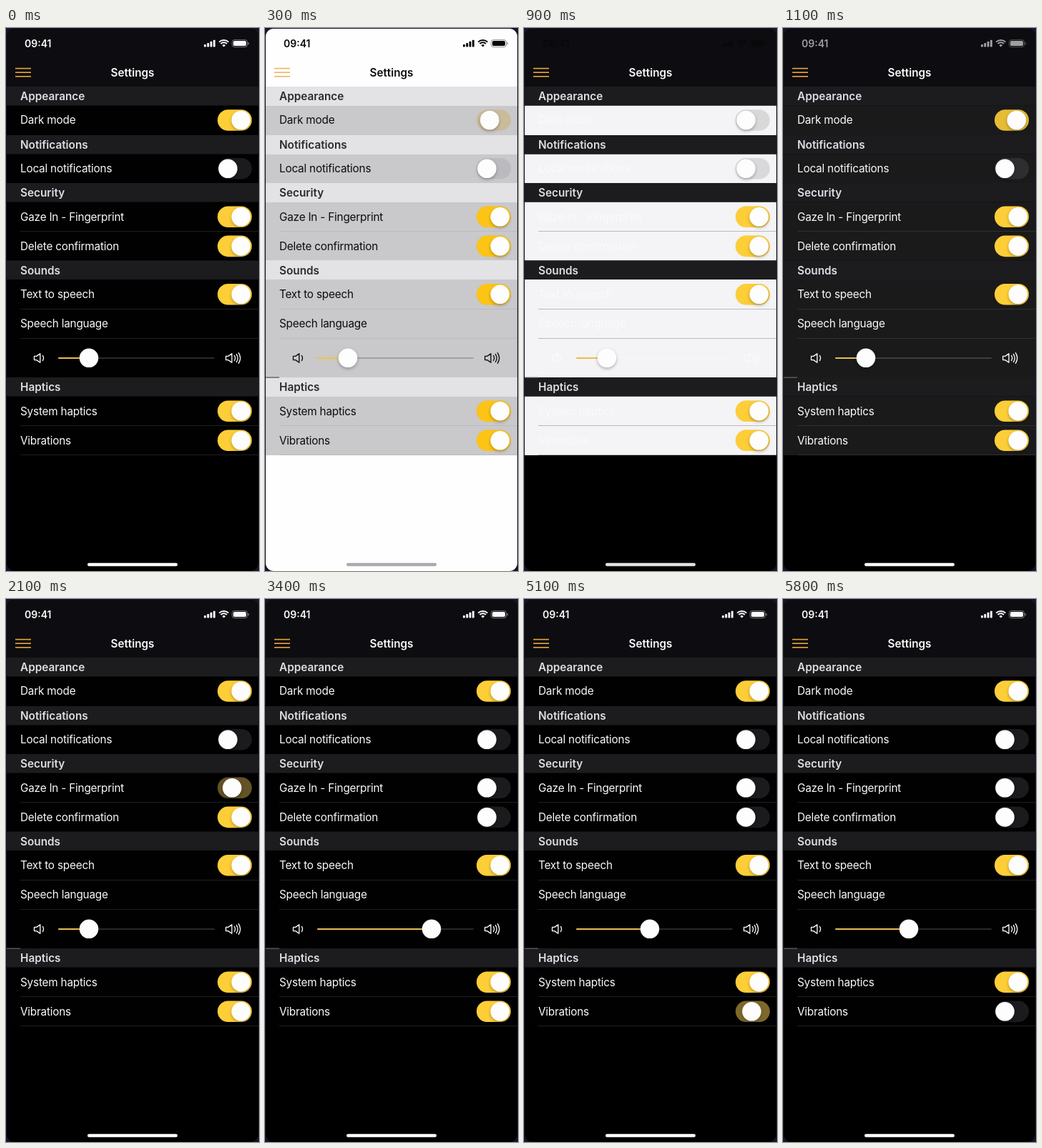
These frames come from a looping animation (354 by 760 pixels, 5.9 s). An HTML page with a canvas:

```html
<!DOCTYPE html>
<html lang="en">
<head>
<meta charset="utf-8">
<title>Settings</title>
<style>
html, body { margin: 0; width: 100%; height: 100%; overflow: hidden; background: #15152b; }
canvas { display: block; width: 354px; height: 760px; }
</style>
</head>
<body>
<canvas id="stage"></canvas>
<script>
const W = 354, H = 760, LOOP = 5900;
const LIGHT_AT = 138, DARK_AT = 895, FADE = 300;
const FONT = 'Inter, "Open Sans", sans-serif';
const canvas = document.getElementById('stage');
const ctx = canvas.getContext('2d');
const dpr = window.devicePixelRatio || 1;
canvas.width = W * dpr;
canvas.height = H * dpr;

const sections = [
  ['Appearance', 82, 108.5, 150],
  ['Notifications', 150, 176.5, 217],
  ['Security', 217, 243.5, 325.5],
  ['Sounds', 325.5, 352, 489],
  ['Haptics', 489, 515.5, 598]
];
const labels = [
  ['Dark mode', 129], ['Local notifications', 197],
  ['Gaze In - Fingerprint', 264.5], ['Delete confirmation', 305.5],
  ['Text to speech', 373], ['Speech language', 414],
  ['System haptics', 536.5], ['Vibrations', 577.5]
];
const separators = [284.5, 393.5, 434.5, 556.5, 597.5];
// Slider drag: time, x
const drag = [[3000, 116], [3400, 233], [3650, 250], [4300, 176]];

const clamp = v => Math.max(0, Math.min(1, v));
const mix = (a, b, p) => a + (b - a) * p;
const rgb = (a, b, p) => `rgb(${a.map((v, i) => Math.round(mix(v, b[i], p)))})`;
const gray = v => rgb([v, v, v], [v, v, v], 0);
const easeOut = (t, start, dur = FADE) => 1 - (1 - clamp((t - start) / dur)) ** 2;
const switchOff = (t, start) => 1 - easeOut(t, start);

function sliderX(t) {
  if (t <= drag[0][0]) return drag[0][1];
  for (let i = 1; i < drag.length; i++) {
    const [t0, x0] = drag[i - 1], [t1, x1] = drag[i];
    if (t < t1) {
      const q = (t - t0) / (t1 - t0);
      return mix(x0, x1, q * q * (3 - 2 * q));
    }
  }
  return drag[drag.length - 1][1];
}

function rect(x, y, w, h, color) {
  ctx.fillStyle = color;
  ctx.fillRect(x, y, w, h);
}

function pill(x, y, w, h, r, color) {
  ctx.fillStyle = color;
  ctx.beginPath();
  ctx.roundRect(x, y, w, h, r);
  ctx.fill();
}

function text(str, x, y, size, weight, color, align = 'left', spacing = 0) {
  ctx.font = `${weight} ${size}px ${FONT}`;
  ctx.textAlign = align;
  ctx.letterSpacing = spacing + 'px';
  ctx.fillStyle = color;
  ctx.fillText(str, x, y);
}

function knob(x, y) {
  ctx.save();
  ctx.shadowColor = 'rgba(0,0,0,.28)';
  ctx.shadowBlur = 4 * dpr;
  ctx.shadowOffsetY = 2 * dpr;
  ctx.fillStyle = '#fdfdfd';
  ctx.beginPath();
  ctx.arc(x, y, 13.3, 0, Math.PI * 2);
  ctx.fill();
  ctx.restore();
}

function toggle(y, on, light) {
  const track = light ? 'rgba(120,120,128,.17)' : 'rgba(120,120,128,.22)';
  pill(296, y - 14.8, 48, 29.6, 14.8, track);
  if (on > 0) {
    ctx.globalAlpha = on;
    pill(296, y - 14.8, 48, 29.6, 14.8, light ? '#fcc414' : '#fdce38');
    ctx.globalAlpha = 1;
  }
  knob(mix(310.5, 328.8, on), y);
}

function statusBar(color) {
  text('09:41', 26, 26.5, 14, 600, color);
  for (let i = 0; i < 4; i++) {
    const h = 3.5 + i * 2.1;
    pill(277 + i * 4.3, 26.5 - h, 2.9, h, 0.8, color);
  }
  ctx.strokeStyle = color;
  ctx.lineWidth = 2;
  ctx.lineCap = 'butt';
  for (const r of [9.3, 6]) {
    ctx.beginPath();
    ctx.arc(304.8, 26.2, r, -Math.PI * 0.75, -Math.PI * 0.25);
    ctx.stroke();
  }
  ctx.fillStyle = color;
  ctx.beginPath();
  ctx.moveTo(304.8, 26.5);
  ctx.arc(304.8, 26.5, 3.3, -Math.PI * 0.75, -Math.PI * 0.25);
  ctx.fill();
  ctx.globalAlpha = 0.45;
  ctx.lineWidth = 1;
  ctx.beginPath();
  ctx.roundRect(316.5, 16.6, 21, 10, 3);
  ctx.stroke();
  pill(338.6, 19.9, 1.4, 3.6, 0.7, color);
  ctx.globalAlpha = 1;
  pill(318, 18.1, 18, 7, 1.8, color);
}

function speaker(x, y, waves, color) {
  ctx.strokeStyle = color;
  ctx.lineWidth = 1.35;
  ctx.lineJoin = ctx.lineCap = 'round';
  ctx.beginPath();
  ctx.moveTo(x, y - 2.6);
  ctx.lineTo(x + 3.2, y - 2.6);
  ctx.lineTo(x + 8.3, y - 6.3);
  ctx.lineTo(x + 8.3, y + 6.3);
  ctx.lineTo(x + 3.2, y + 2.6);
  ctx.lineTo(x, y + 2.6);
  ctx.closePath();
  ctx.stroke();
  for (let i = 0; i < waves; i++) {
    ctx.beginPath();
    ctx.arc(x + 6.5, y, 6.4 + i * 3.5, -0.58, 0.58);
    ctx.stroke();
  }
}

function draw(t) {
  const light = t >= LIGHT_AT && t < DARK_AT;
  const fade = t < DARK_AT ? easeOut(t, LIGHT_AT) : 1 - easeOut(t, DARK_AT);
  const ink = light ? '#0c0c0e' : '#fafafa';

  ctx.setTransform(dpr, 0, 0, dpr, 0, 0);
  rect(0, 0, W, H, '#15152b');
  ctx.save();
  ctx.beginPath();
  ctx.roundRect(1, 1, 352, 759, 11);
  ctx.clip();
  rect(0, 0, W, H, light ? '#fefefe' : '#000');
  if (!light) rect(0, 0, W, 82, '#0d0c10');

  const early = t < DARK_AT;
  const status = early ? 1 - clamp((t - LIGHT_AT) / 120) : clamp((t - DARK_AT - 50) / 250);
  statusBar(gray(mix(8, 250, status)));
  text('Settings', 177, 67.5, 15.3, 600, ink, 'center');
  for (let i = 0; i < 3; i++) {
    rect(13, 55.8 + i * 5.6, 22, 1.6, light ? '#ecb75e' : '#e9a63c');
  }

  const cell = rgb([1, 1, 2], [254, 253, 255], fade);
  const header = light ? rgb([140, 138, 142], [250, 249, 251], fade) : '#1c1b1e';
  for (const [name, top, mid, bottom] of sections) {
    rect(0, mid, W, bottom - mid, cell);
    rect(0, top, W, mid - top, header);
    text(name, 20, (top + mid) / 2 + 6, 15.3, 600, light ? '#2b2b2e' : '#dedee2');
  }
  for (const y of separators) {
    rect(20, y - 0.5, W - 20, 1, light ? 'rgba(60,60,67,.1)' : 'rgba(84,84,88,.36)');
  }
  if (t >= LIGHT_AT) rect(0, 488.6, 20, 1, light ? '#333' : '#777');

  for (const [name, y] of labels) {
    text(name, 20, y + 5.4, 15.3, 400, ink, 'left', -0.2);
  }

  const dark = early ? switchOff(t, LIGHT_AT) : easeOut(t, DARK_AT + 5);
  toggle(129, dark, light);
  toggle(196.8, 0, light);
  toggle(264.3, switchOff(t, 1970), light);
  toggle(305.4, switchOff(t, 2600), light);
  toggle(372.8, 1, light);
  toggle(536.2, 1, light);
  toggle(577.3, switchOff(t, 5000), light);

  const x = sliderX(t);
  speaker(39.5, 462, 1, ink);
  speaker(307.7, 462, 3, ink);
  pill(73, 461, 219, 2, 1, light ? 'rgba(60,60,67,.28)' : 'rgba(255,255,255,.16)');
  pill(73, 460.9, x - 73, 2.2, 1, light ? '#f5c236' : '#e9bd52');
  knob(x, 461.8);

  pill(114, 748.8, 126, 4.4, 2.2, light ? '#aaaaac' : gray(mix(253, 225, fade)));
  ctx.restore();
}

const start = performance.now();
function tick() {
  draw((performance.now() - start) % LOOP);
  requestAnimationFrame(tick);
}
tick();
</script>
</body>
</html>
```
